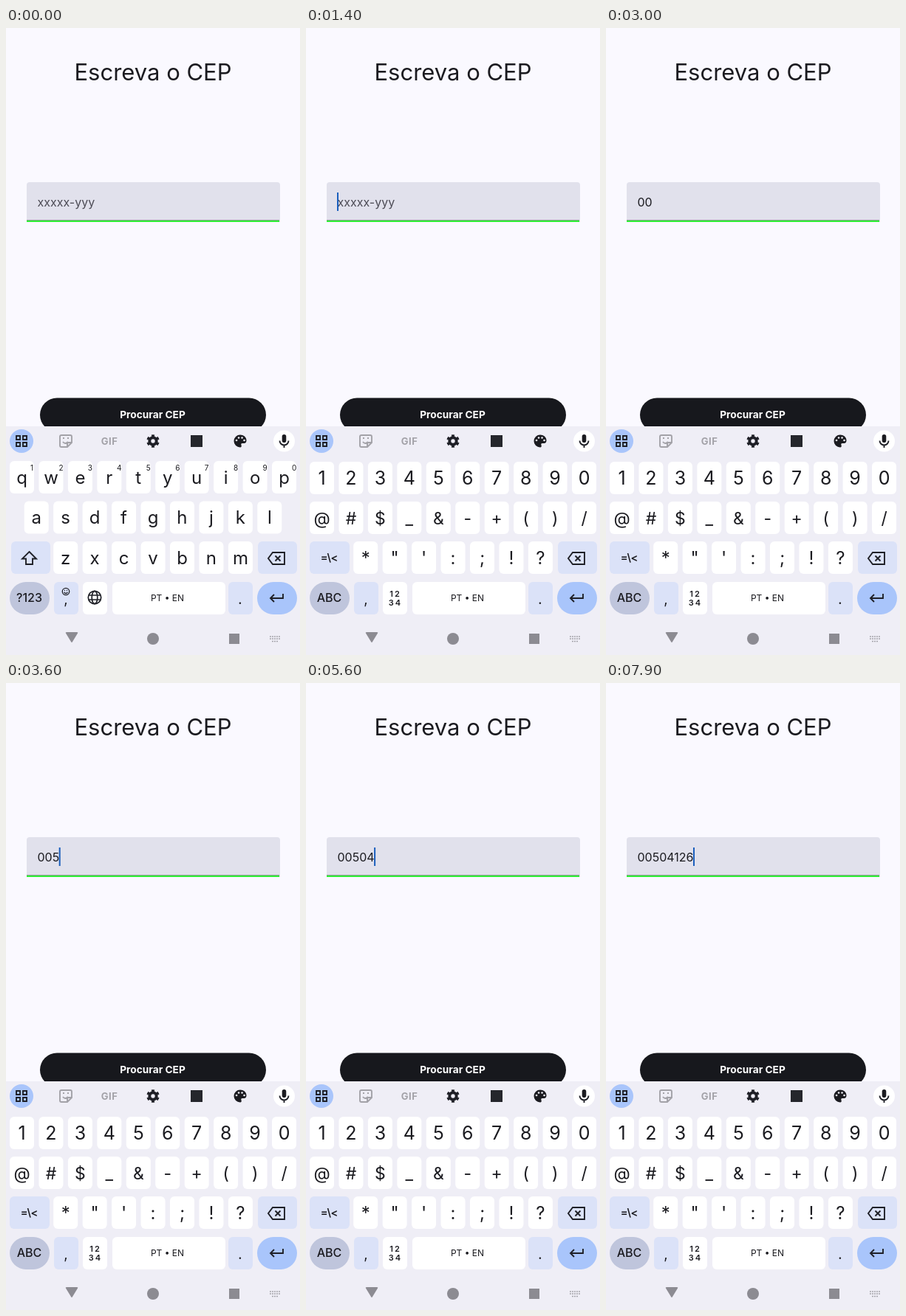
Write an HTML page that moves like this. It is 398 px wide and 850 px high and loops after 8 s.

```html
<!DOCTYPE html>
<html lang="pt">
<head>
<meta charset="utf-8">
<title>Escreva o CEP</title>
<style>
  html, body { margin: 0; height: 100%; overflow: hidden; background: #faf9ff; }
  svg { display: block; width: 100%; height: 100%; font-family: Inter, sans-serif; fill: #1b1b20; }
  .mid { text-anchor: middle; }
  .line { fill: none; stroke: #1f2027; stroke-width: 1.9; }
  .gray { stroke: #a3a2a8; }
</style>
</head>
<body>
<svg viewBox="0 0 398 850">
  <text class="mid" x="199" y="71" font-size="31">Escreva o CEP</text>
  <path d="M28 263V213q0-4 4-4H367q4 0 4 4V263z" fill="#e1e1ec"/>
  <rect x="28" y="260" width="342" height="1" fill="#8fa296"/>
  <rect x="28" y="261" width="342" height="2" fill="#2fee35"/>
  <text id="value" x="42.5" y="242" font-size="16"></text>
  <rect id="cursor" y="223" width="2" height="25" fill="#1b5fbd"/>
  <rect x="46" y="501.500" width="306" height="46" rx="23" fill="#17181d"/>
  <text class="mid" x="198.500" y="529" font-size="13.700" font-weight="700" fill="#fff">Procurar CEP</text>

  <rect y="540" width="398" height="310" fill="#efeef6"/>
  <g id="toolbar">
    <circle cx="21" cy="560" r="16" fill="#a9c5fb"/>
    <path class="line" d="M14 553h5v5h-5zM23 553h5v5h-5zM14 562h5v5h-5zM23 562h5v5h-5z"/>
    <path class="line gray" d="M75 552H87q2 0 2 2V562L83 568H75q-2 0-2-2V554q0-2 2-2zM89 562H85q-2 0-2 2V568M77 561q3 4 7 0M77 556h2M83 556h2"/>
    <text class="mid" x="140" y="565" font-size="13" font-weight="700" letter-spacing=".5" fill="#a3a2a8">GIF</text>
    <circle cx="199" cy="560" r="4.700" class="line" style="stroke-width:4"/>
    <circle cx="199" cy="560" r="7" class="line" style="stroke-width:3.500" pathLength="12" stroke-dasharray="1 1" stroke-dashoffset="-.5"/>
    <rect x="250" y="552" width="16" height="16" fill="#25262c"/>
    <path d="M317 551.500a8.500 8.500 0 1 0 0 17q2.500-.5 1.500-3t1.500-2.500h2q3.500 0 3.500-4c0-4.500-4-7.500-8.500-7.500z"/>
    <path d="M312 559h.1M315 555.500h.1M319.500 555.500h.1M322.500 559h.1" stroke="#efeef6" stroke-width="2.600" stroke-linecap="round"/>
    <circle cx="376.500" cy="560" r="14.500" fill="#fff"/>
    <rect x="373.700" y="551" width="5.600" height="11" rx="2.800"/>
    <path class="line" d="M370.500 559.500a6 6 0 0 0 12 0M376.500 565.500V569"/>
  </g>
  <g id="shared"></g>
  <g id="letters"></g>
  <g id="symbols"></g>
  <g id="nav" fill="#8c8b92">
    <path d="M82 819H96q2 0 1 1.500L90 832q-1 2-2 0L81 820.500q-1-1.500 1-1.500z"/>
    <circle cx="199" cy="828" r="8"/>
    <rect x="302" y="821" width="14" height="14"/>
    <path d="M357 825h14M357 828h14M360 831.500h8" fill="none" stroke="#a5a4ab" stroke-width="1.600" stroke-dasharray="2 1"/>
  </g>
  <g id="popup">
    <circle cy="556" r="27" fill="#fff" style="filter:drop-shadow(0 1px 2px #0004)"/>
    <text id="popupDigit" class="mid" y="565.500" font-size="27"></text>
    <path d="M-4.500 575.500h2M-1 575.500h2M2.500 575.500h2" stroke="#1b1b20" stroke-width="1.800"/>
  </g>
</svg>
<script>
const $ = id => document.getElementById(id);
const LOOP = 8000, PITCH = 39.45, FIRST = 21.5;
const BLUE = '#dbe2f8', PILL = '#bfc5dc';

const escapeText = s => s.replace(/&/g, '&amp;').replace(/</g, '&lt;');
const label = (s, x, y, size, extra = '') =>
  `<text class="mid" x="${x}" y="${y}" font-size="${size}" ${extra}>${escapeText(s)}</text>`;
const box = (x, y, w, fill = '#fff', r = 6) =>
  `<rect x="${x}" y="${y}" width="${w}" height="44" rx="${r}" fill="${fill}"/>`;
const keyRow = (chars, x, y, size) => [...chars].map((c, i) => {
  const cx = x + i * PITCH;
  return box(cx - 16.5, y, 33) + label(c, cx, y + 30.5, size);
}).join('');

$('shared').innerHTML =
  box(341, 696, 53, BLUE) + box(5, 751, 54, PILL, 22) + box(65, 751, 33, BLUE) +
  box(104, 751, 33) + box(144, 751, 153) + box(301, 751, 33, BLUE) +
  box(340, 751, 54, '#a9c5fb', 22) +
  label('PT • EN', 218.5, 777, 12) + label('.', 317, 781, 20) +
  `<path class="line" d="M361 711H377V727H361L355 719zM364.500 715.500l7 7M371.500 715.500l-7 7"/>
   <path class="line" d="M375 767V773H358M363 768l-5 5 5 5"/>`;

$('letters').innerHTML =
  keyRow('qwertyuiop', FIRST, 587, 24) +
  [...'1234567890'].map((c, i) => label(c, 35 + i * PITCH, 600, 10)).join('') +
  keyRow('asdfghjkl', 41.2, 641.5, 24) + keyRow('zxcvbnm', 80.7, 696, 24) +
  box(7, 696, 53, BLUE) + label('?123', 31.5, 778, 16, 'font-weight="500"') +
  label(',', 81, 781, 19) +
  `<path class="line" d="M31.500 710L41 719.500H36V727H27V719.500H22z"/>
   <g class="line" style="stroke-width:1.300"><circle cx="81" cy="764" r="4.700"/>
   <path d="M78.500 765q2.500 3 5 0M79 762.500h1M82 762.500h1"/></g>
   <g class="line" style="stroke-width:1.700"><circle cx="120" cy="772" r="8.700"/>
   <ellipse cx="120" cy="772" rx="3.800" ry="8.700"/><path d="M112 769h16M112 775h16"/></g>`;

$('symbols').innerHTML =
  keyRow('1234567890', FIRST, 588, 25) + keyRow('@#$_&-+()/', FIRST, 642, 23) +
  keyRow(`*"':;!?`, 80.7, 696, 24) + box(5, 696, 54, BLUE) +
  label('=\\<', 31.5, 723, 14.5, 'font-weight="600"') +
  label('ABC', 31.5, 778, 16, 'font-weight="500"') + label(',', 81, 781, 19) +
  label('12', 121, 771, 11, 'font-weight="600" letter-spacing="2"') +
  label('34', 121, 783, 11, 'font-weight="600" letter-spacing="2"');
const digitKeys = [...$('symbols').querySelectorAll('text')].slice(0, 10);

// Each digit appears in the field when its key is released.
const presses = [
  ['0', 1600, 1700], ['0', 2300, 2400], ['5', 3200, 3400], ['0', 4800, 4900],
  ['4', 5300, 5400], ['1', 6500, 6700], ['2', 7300, 7400], ['6', 7600, 7800]
];

function draw(t) {
  const typed = presses.filter(p => t >= p[2]);
  const held = presses.find(p => t >= p[1] && t < p[2]);
  const symbols = t >= 100;
  $('letters').style.display = symbols ? 'none' : '';
  $('symbols').style.display = symbols ? '' : 'none';

  const value = $('value');
  value.textContent = typed.map(p => p[0]).join('') || 'xxxxx-yyy';
  value.setAttribute('fill', typed.length ? '#1b1b20' : '#4c4b55');

  // The blink restarts with every typed digit.
  const blinkStart = typed.length ? typed[typed.length - 1][2] : -600;
  $('cursor').style.display = Math.floor((t - blinkStart) / 500) % 2 ? 'none' : '';
  $('cursor').setAttribute('x', 42 + (typed.length ? value.getComputedTextLength() : 0));

  const pressed = held ? (Number(held[0]) + 9) % 10 : -1;
  digitKeys.forEach((key, i) => key.setAttribute('fill', i === pressed ? '#b7b7bc' : '#1b1b20'));
  $('popup').style.display = held ? '' : 'none';
  if (held) {
    const x = Math.max(27, Math.min(371, FIRST + pressed * PITCH));
    $('popup').setAttribute('transform', `translate(${x} 0)`);
    $('popupDigit').textContent = held[0];
  }
}

const start = performance.now();
function tick() {
  draw((performance.now() - start) % LOOP);
  requestAnimationFrame(tick);
}
tick();
</script>
</body>
</html>
```
